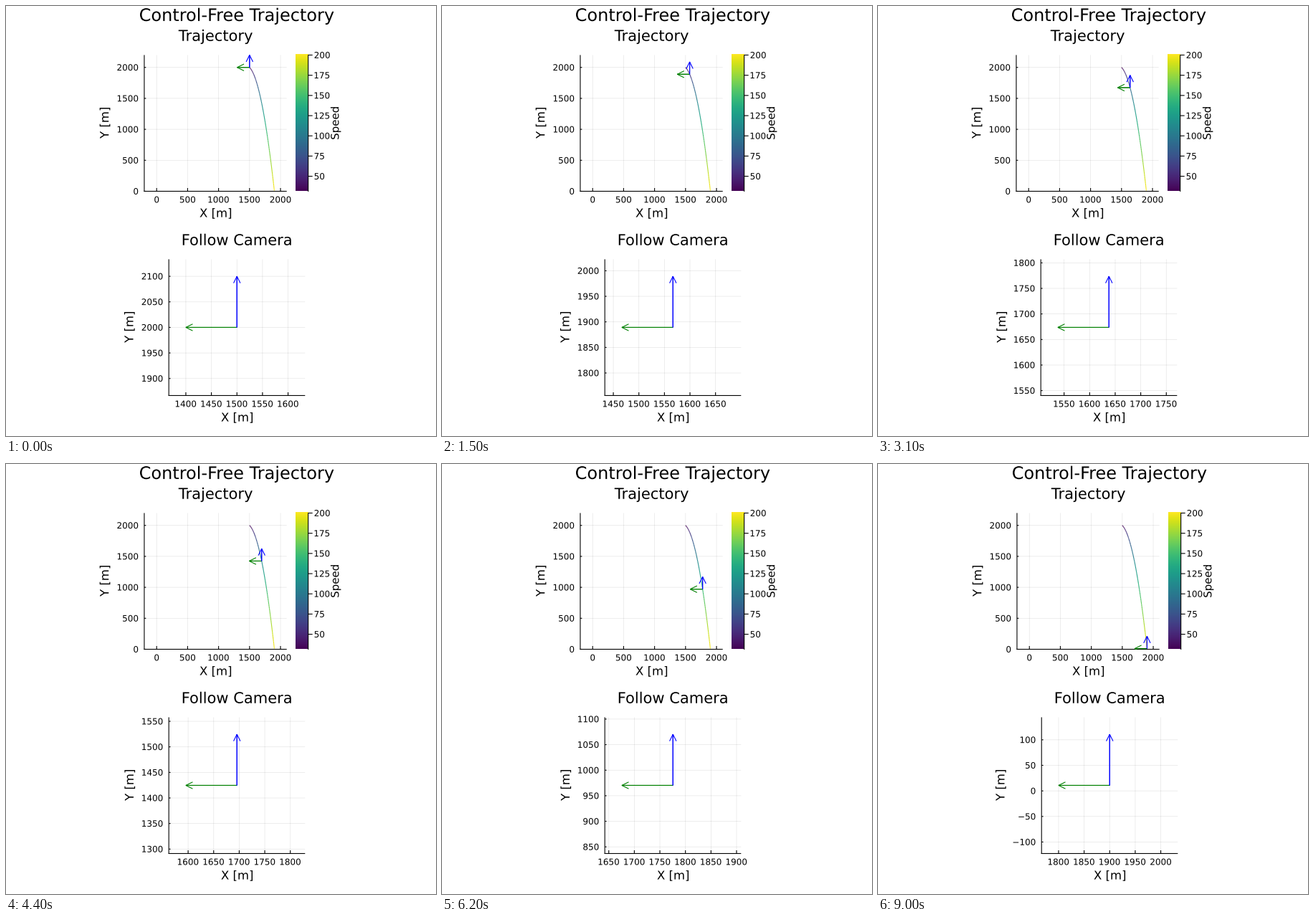
Animation of 600x600 px, one loop 9100 ms. Source, as a matplotlib script:

```python
from functools import lru_cache

import numpy as np
import matplotlib.pyplot as plt
from matplotlib.animation import FuncAnimation
from matplotlib.collections import LineCollection
from matplotlib.patches import PathPatch, Rectangle
from matplotlib.path import Path
from matplotlib.textpath import TextPath
from matplotlib.transforms import Affine2D

plt.rcParams["font.family"] = "DejaVu Sans"

FRAMES, INTERVAL = 91, 100
DT, G, V0 = 0.2, 9.81, 200 / 9
TICK, GUIDE, TITLE, SUPTITLE = 12, 16.5, 21, 24
PLOT_H = 190.1
HALF = 133.3          # half span of the follow camera
CAP = 0.3645          # half cap height, in em
PX = 0.72             # points per pixel

# ballistic fall with equal sideways and downward starting speed
t = np.arange(FRAMES) * DT
px = 1500 + V0 * t
py = 2000 - V0 * t - G * t**2 / 2
speed = np.hypot(V0, V0 + G * t)
LOW, HIGH = speed[0], speed[-1]

fig = plt.figure(figsize=(6, 6), dpi=100, facecolor="white")
ax = fig.add_axes([0, 0, 1, 1], xlim=(0, 600), ylim=(600, 0))
ax.axis("off")
shift = Affine2D()
stage = shift + ax.transData


@lru_cache(maxsize=None)
def glyphs(s, size):
    path = TextPath((0, 0), s, size=size)
    return path.vertices, path.codes, path.get_extents()


def ink_width(s):
    return glyphs(s, TICK)[2].width


def number(v):
    return str(int(v)).replace("-", "\u2212")


def steps(lo, hi, step):
    return np.arange(np.ceil(lo / step), np.floor(hi / step) + 1) * step


def strokes(width=1.1, zorder=1, clip=None, **kw):
    art = LineCollection([], linewidths=width * PX, zorder=zorder,
                         transform=stage, capstyle="butt",
                         joinstyle="miter", **kw)
    art.set_snap(False)
    ax.add_collection(art, autolim=False)
    if clip is not None:
        art.set_clip_path(clip)
    return art


class Layer:
    """Collects black text, black lines and pale grid lines."""

    def __init__(self):
        self.grid_art = strokes(0.7, colors="black", alpha=0.1)
        self.line_art = strokes(colors="black")
        self.text_art = PathPatch(Path(np.zeros((1, 2))), fc="black", lw=0,
                                  transform=stage, zorder=4)
        ax.add_artist(self.text_art)
        self.start()

    def start(self):
        self.grids, self.lines, self.verts, self.codes = [], [], [], []

    def line(self, x0, y0, x1, y1):
        self.lines.append([(x0, y0), (x1, y1)])

    def grid(self, x0, y0, x1, y1):
        self.grids.append([(x0, y0), (x1, y1)])

    def write(self, x, y, s, size, align="center", upright=False):
        """Text with its baseline at y (or at x when turned upright)."""
        verts, codes, box = glyphs(s, size)
        u = verts[:, 0] - {"left": box.x0, "right": box.x1,
                           "center": (box.x0 + box.x1) / 2}[align]
        v = verts[:, 1]
        dx, dy = (-v, -u) if upright else (u, -v)
        self.verts.append(np.column_stack([x + dx, y + dy]))
        self.codes.append(codes)

    def finish(self):
        self.grid_art.set_segments(self.grids)
        self.line_art.set_segments(self.lines)
        self.text_art.set_path(Path(np.concatenate(self.verts),
                                    np.concatenate(self.codes)))


class Panel:
    def __init__(self, mid, bottom, width, height, step):
        self.scale = PLOT_H / height
        self.w = width * self.scale
        self.mid, self.bottom, self.step = mid, bottom, step
        self.left, self.top = mid - self.w / 2, bottom - PLOT_H
        self.right = self.left + self.w
        self.span = width, height
        self.clip = Rectangle((self.left, bottom), self.w, -PLOT_H,
                              transform=stage)
        self.arrows = strokes(zorder=3, clip=self.clip,
                              colors=["green"] * 3 + ["blue"] * 3)

    def look_at(self, x0, y0):
        self.x0, self.y0 = x0, y0
        self.xticks = steps(x0, x0 + self.span[0], self.step)
        self.yticks = steps(y0, y0 + self.span[1], self.step)
        self.widest = max(ink_width(number(v)) for v in self.yticks)

    def x(self, v):
        return self.left + (v - self.x0) * self.scale

    def y(self, v):
        return self.bottom - (v - self.y0) * self.scale

    def draw_frame(self, layer, title):
        layer.line(self.left, self.top, self.left, self.bottom + 0.5)
        layer.line(self.left - 0.5, self.bottom, self.right, self.bottom)
        layer.write(self.mid, self.bottom + 36.1, "X [m]", GUIDE)
        layer.write(self.mid, self.top - 19.7, title, TITLE)

    def draw_ticks(self, layer):
        l, r, top, b = self.left, self.right, self.top, self.bottom
        for v in self.xticks:
            x = self.x(v)
            layer.grid(x, b, x, top)
            layer.line(x, b, x, b - 4.5)
            layer.write(x, b + 15.9, number(v), TICK)
        for v in self.yticks:
            y = self.y(v)
            layer.grid(l, y, r, y)
            layer.line(l, y, l + 2.4, y)
            layer.write(l - 8.7, y + CAP * TICK, number(v), TICK, "right")
        gap = 49.7 + self.widest - ink_width("2000")
        layer.write(l - gap, (top + b) / 2, "Y [m]", GUIDE, upright=True)

    def draw_arrows(self, x, y, length):
        x, y, n = self.x(x), self.y(y), length * self.scale
        segs = []
        for ux, uy in ((-1, 0), (0, -1)):
            tip = x + n * ux, y + n * uy
            bx, by = tip[0] - 9.5 * ux, tip[1] - 9.5 * uy
            shaft = [(x, y), tip]
            head = [(bx - 4.7 * uy, by + 4.7 * ux), tip,
                    (bx + 4.7 * uy, by - 4.7 * ux)]
            segs += [shaft, shaft, head]
        self.arrows.set_segments(segs)


def colorbar(layer, panel):
    l, r = panel.right + 12, panel.right + 30
    top, b = panel.top, panel.bottom
    ax.imshow(np.linspace(0, 1, 256)[:, None], cmap="viridis",
              extent=(l, r, b, top), origin="lower", aspect="auto",
              interpolation="nearest", transform=stage, zorder=0)
    ax.set(xlim=(0, 600), ylim=(600, 0))
    layer.line(r, top, r, b + 0.5)
    for v in steps(LOW, HIGH, 25):
        y = b - (v - LOW) / (HIGH - LOW) * PLOT_H
        layer.line(r, y, r + 6, y)
        layer.write(r + 8.9, y + CAP * TICK, number(v), TICK, "left")
    layer.write(r + 42.6, (top + b) / 2, "Speed", 15, upright=True)


def trajectory(panel):
    pts = np.column_stack([panel.x(px), panel.y(py)])
    path = strokes(zorder=2, clip=panel.clip, cmap="viridis")
    path.set_segments(np.stack([pts[:-1], pts[1:]], axis=1))
    path.set_array(speed[:-1])
    path.set_clim(LOW, HIGH)


overview = Panel(292.3, 258.5, 2300, 2200, 500)
follow = Panel(322.25, 543.5, 2 * HALF, 2 * HALF, 50)
overview.look_at(-200, 0)

fixed, live = Layer(), Layer()
overview.draw_frame(fixed, "Trajectory")
overview.draw_ticks(fixed)
colorbar(fixed, overview)
trajectory(overview)
follow.draw_frame(fixed, "Follow Camera")
fixed.write(322.2, 20.9, "Control-Free Trajectory", SUPTITLE)
fixed.finish()


def update(k):
    x, y = px[k], py[k]
    follow.look_at(x - HALF, y - HALF)

    # wide tick labels push the whole layout to the right
    extra = max(0, follow.widest - ink_width("2000"))
    shift.clear().translate(extra / 2, 0)

    live.start()
    follow.draw_ticks(live)
    live.finish()
    overview.draw_arrows(x, y, 200)
    follow.draw_arrows(x, y, 100)
    return []


anim = FuncAnimation(fig, update, frames=FRAMES, init_func=lambda: [],
                     interval=INTERVAL, repeat=True, repeat_delay=0)
plt.show()
```
